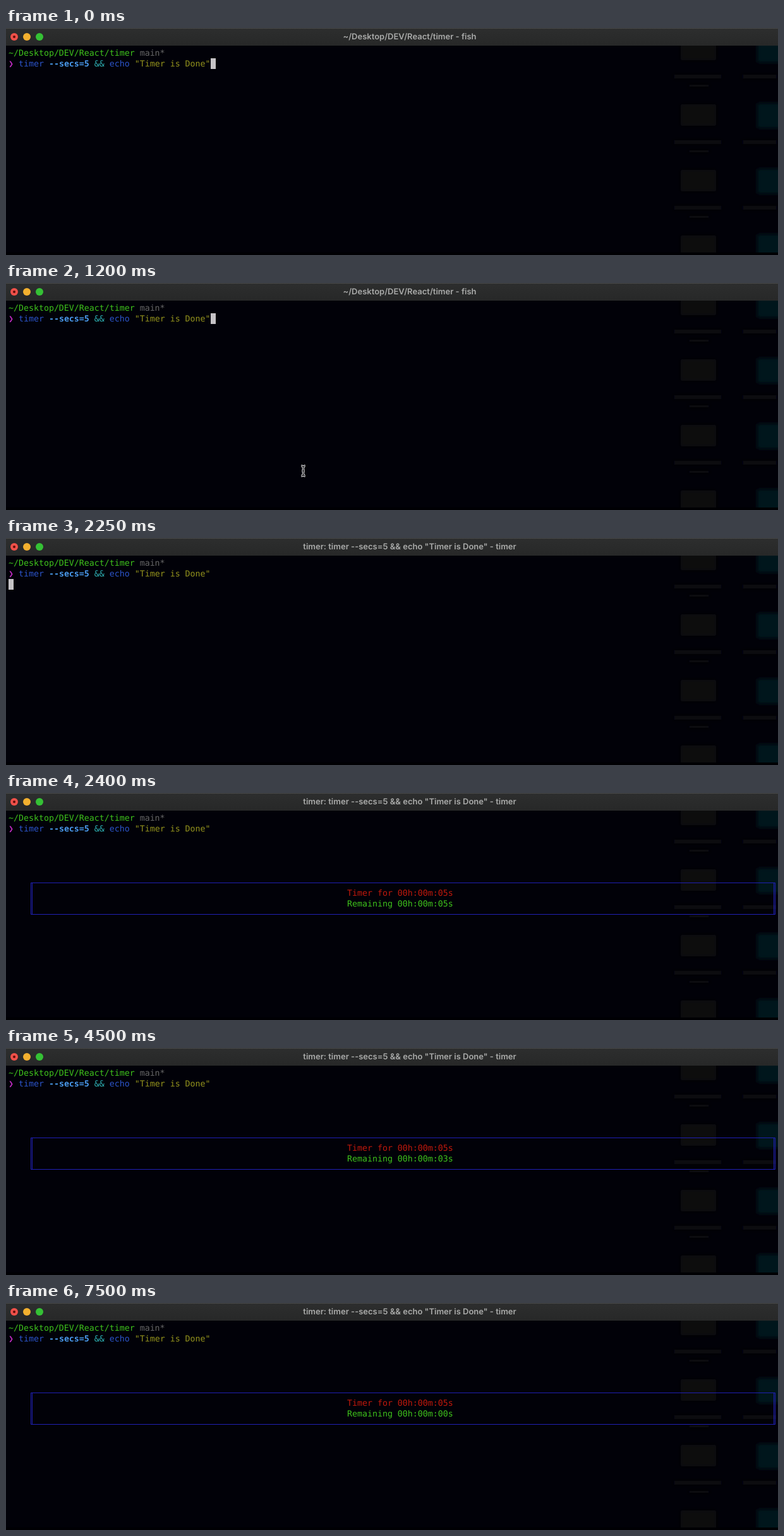
These frames come from a looping animation (1222x360 px, 8 s). An HTML page:

```html
<!DOCTYPE html>
<html lang="en">
<head>
<meta charset="utf-8">
<title>Terminal timer</title>
<style>
  html, body { margin: 0; width: 100%; height: 100%; overflow: hidden; background: #010108; }
  svg { display: block; }
  text { white-space: pre; text-rendering: geometricPrecision; }
  .mono { font: 13.288px "DejaVu Sans Mono", monospace; }
  .bold { font-weight: bold; }
  #title { font: 600 13px Inter, "Open Sans", sans-serif; fill: #a9aaa9; text-anchor: middle; }
  .green { fill: #3fc41c; }
  .blue { fill: #2c55cc; }
</style>
</head>
<body>
<svg width="1222" height="360" viewBox="0 0 1222 360">
  <defs>
    <filter id="blur" x="-50%" y="-50%" width="200%" height="200%"><feGaussianBlur stdDeviation="3"/></filter>
    <linearGradient id="bar" x2="0" y2="1">
      <stop stop-color="#2d2e2e"/><stop offset="1" stop-color="#272828"/>
    </linearGradient>
  </defs>
  <rect width="1222" height="360" fill="#010108"/>
  <g id="desktop" filter="url(#blur)"></g>
  <rect y="356" width="1222" height="4" fill="#000003"/>
  <rect width="1222" height="28" fill="url(#bar)"/>
  <rect width="1222" height="1" fill="#484949"/>
  <circle cx="13" cy="14" r="6" fill="#ee5049"/>
  <circle cx="13" cy="14" r="2" fill="#5c0d0a"/>
  <circle cx="33" cy="14" r="6" fill="#f3b02f"/>
  <circle cx="53" cy="14" r="6" fill="#35c135"/>
  <text id="title" x="639" y="18"></text>

  <g class="mono">
    <text x="4" y="44" class="green">~/Desktop/DEV/React/timer <tspan fill="#666">main*</tspan></text>
    <text x="4" y="61" fill="#c12bc4">❯</text>
    <text x="20" y="61" class="blue">timer <tspan class="bold" fill="#4a9bee">--secs=5</tspan> <tspan fill="#2eb0b4">&amp;&amp;</tspan> echo <tspan fill="#94931d">"Timer is Done"</tspan></text>
  </g>
  <rect id="caret" width="8" height="17" fill="#c5c3c6"/>

  <g id="panel">
    <path d="M39.5 142.5H1217.5V192.5H39.5ZM41.5 142V193M1215.5 142V193" fill="none" stroke="#2020b4"/>
    <g class="mono">
      <text x="540" y="163" fill="#c2190c">Timer for 00h:00m:05s</text>
      <text x="540" y="180" class="green" id="left"></text>
    </g>
  </g>

  <g id="mouse" fill="none">
    <path id="beam" d="M-3-8Q0-8 0-5V5Q0 8-3 8M3-8Q0-8 0-5M0 5Q0 8 3 8M-2 0H2" stroke="#e4e4e4" stroke-width="3.2"/>
    <use href="#beam"/>
    <path d="M-3-8Q0-8 0-5V5Q0 8-3 8M3-8Q0-8 0-5M0 5Q0 8 3 8M-2 0H2" stroke="#08080c" stroke-width="1.2"/>
  </g>
</svg>
<script>
const $ = id => document.getElementById(id);
const LOOP = 8000, ENTER = 2000, RENAME = 2150, START = 2400, FIRST_TICK = 3500;
const MOVE_FROM = 350, MOVE_TO = 650;

// Desktop icons showing faintly through the window
const blob = (x, y, w, h, fill) =>
  `<rect x="${x}" y="${y}" width="${w}" height="${h}" rx="3" fill="${fill}"/>`;
$("desktop").innerHTML = [17, 121, 225, 329].map(y =>
  blob(1068, y, 56, 34, "#0b0b10") +
  blob(1189, y - 2, 40, 40, "#02161d") +
  blob(1056, y + 57, 78, 6, "#08080f") +
  blob(1080, y + 72, 34, 5, "#08080d") +
  blob(1164, y + 57, 58, 6, "#07070e")).join("");

const show = (id, on) => $(id).setAttribute("visibility", on ? "visible" : "hidden");

function draw(t) {
  $("title").textContent = t < RENAME
    ? "~/Desktop/DEV/React/timer - fish"
    : 'timer: timer --secs=5 && echo "Timer is Done" - timer';

  show("caret", t < START);
  $("caret").setAttribute("x", t < ENTER ? 324 : 4);
  $("caret").setAttribute("y", t < ENTER ? 48 : 65);

  show("panel", t >= START);
  const ticks = Math.max(0, Math.floor((t - FIRST_TICK) / 1000) + 1);
  $("left").textContent = `Remaining 00h:00m:0${5 - ticks}s`;

  // The pointer is sampled every 50 ms as it glides to rest
  show("mouse", t >= MOVE_FROM && t < ENTER);
  const step = Math.floor(t / 50) * 50;
  const p = Math.min(1, Math.max(0, (step - MOVE_FROM) / (MOVE_TO - MOVE_FROM)));
  const rest = (1 - p) ** 2;
  $("mouse").setAttribute("transform", `translate(${470.5 + 13 * rest} ${298 + 32 * rest})`);
}

const begin = performance.now();
function frame() {
  draw((performance.now() - begin) % LOOP);
  requestAnimationFrame(frame);
}
frame();
</script>
</body>
</html>
```
